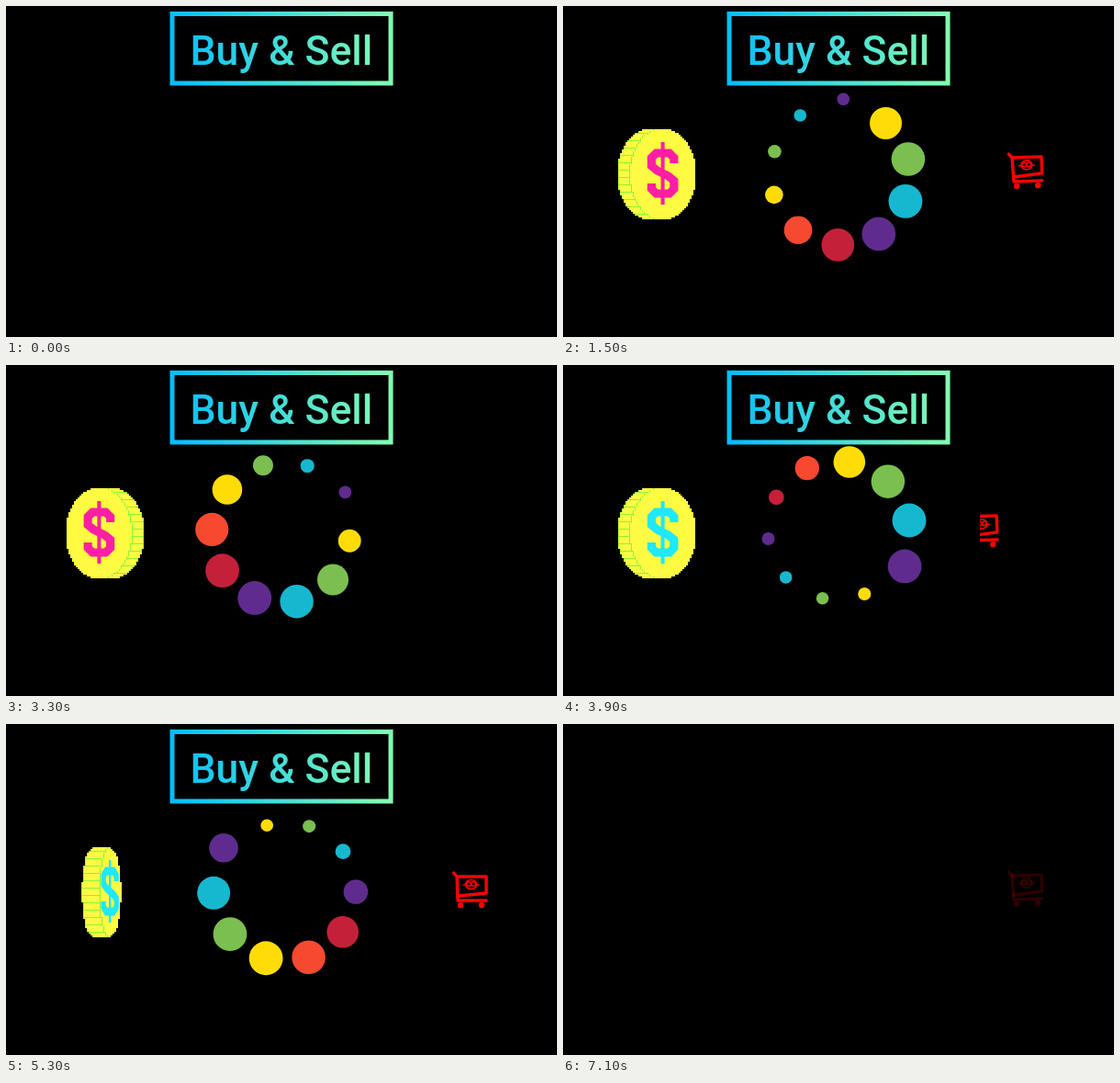
Write an HTML page with a canvas that moves like this. It is 600 px wide and 360 px high and loops after 7.2 s.

```html
<!DOCTYPE html>
<html lang="en">
<head>
<meta charset="utf-8">
<title>Buy &amp; Sell</title>
<style>
  html, body { margin: 0; width: 100%; height: 100%; overflow: hidden; background: #000; }
  canvas, svg { position: absolute; left: 0; top: 0; width: 600px; height: 360px; }
  text { font: 500 44.5px Roboto, sans-serif; }
</style>
</head>
<body>
<canvas id="stage" width="600" height="360"></canvas>
<svg id="title" viewBox="0 0 600 360">
  <defs>
    <linearGradient id="sky" gradientUnits="userSpaceOnUse" x1="179" y1="0" x2="421" y2="0">
      <stop offset="0" stop-color="#04bcff"/>
      <stop offset="1" stop-color="#84ffb0"/>
    </linearGradient>
  </defs>
  <rect x="181" y="8.5" width="238" height="75.5" fill="none" stroke="url(#sky)" stroke-width="5"/>
  <text x="299.8" y="64" text-anchor="middle" fill="url(#sky)">Buy &amp; Sell</text>
</svg>
<script>
const LOOP = 7200, STEP = 100, TAU = 2 * Math.PI;
const ctx = document.getElementById('stage').getContext('2d');
const title = document.getElementById('title');

const clamp = v => Math.max(0, Math.min(1, v));
const rad = deg => deg * Math.PI / 180;
const fade = (t, inAt, outAt) => Math.min(clamp((t - inAt) / 400), clamp((outAt - t) / 400));

// cubic-bezier(.75, 0, .25, 1)
function ease(x) {
  let lo = 0, hi = 1;
  for (let n = 0; n < 24; n++) {
    const s = (lo + hi) / 2, q = 1 - s;
    if (2.25 * s * q * q + 0.75 * s * s * q + s * s * s < x) lo = s; else hi = s;
  }
  return lo * lo * (3 - 2 * lo);
}

function trace(points) {
  ctx.beginPath();
  points.forEach(p => ctx.lineTo(...p));
  ctx.stroke();
}

function oval(x, y, rx, ry, paint) {
  ctx.beginPath();
  ctx.ellipse(x, y, rx, ry, 0, 0, TAU);
  ctx[paint]();
}

// ---- ring of dots: one eased turn, with a size wave running round it
const DOTS = 10;
const COLORS = ['#ffdc05', '#7abf4f', '#16b8d0', '#5f2c8e', '#c4203a', '#f7492f'];

function drawRing(t) {
  const lead = -54.5 + 360 * ease((t - 490) / 7500);
  const wave = 0.00813 * t;
  // The ring sits off its pivot, and the last dots drift outwards.
  const cx = 302 + 4 * Math.cos(rad(lead + 123));
  const cy = 181 + 4 * Math.sin(rad(lead + 123));
  for (let i = 0; i < DOTS; i++) {
    const angle = rad(lead + 35.7 * i);
    const dist = 75 + 8.5 * (i / 9) ** 5;
    const r = 12.6 + 6 * Math.tanh(2.15 * Math.sin((i - wave) * TAU / 13.4));
    ctx.fillStyle = COLORS[i % COLORS.length];
    oval(cx + dist * Math.cos(angle), cy + dist * Math.sin(angle), r, r, 'fill');
  }
}

// ---- coin: sixteen poses per turn, pink in front and cyan behind
const HALF_S = [[12, -11], [12, -17], [7, -22], [-7, -22], [-12, -17], [-12, -8], [-6, -3]];
const S_SHAPE = [...HALF_S, ...HALF_S.map(([x, y]) => [-x, -y]).reverse()];
const snap = v => Math.round(v / 2) * 2;

function drawCoin(t) {
  const phase = Math.floor(t / 100) % 16, half = phase % 8;
  const turn = 4 - Math.abs(4 - half);               // 0 facing us, 4 edge-on
  const side = half && Math.sign(4 - half);          // side on which the rim shows
  const face = 97 * (1 - turn / 4), rim = 20 * (turn / 4) ** 0.3;
  const a = face / 2, left = -(face + rim) / 2;

  ctx.save();
  ctx.translate(105 + side * (4 - turn), 183);
  ctx.save();
  if (side > 0) ctx.scale(-1, 1);
  const row = (x0, x1, y, h, color) => {
    ctx.fillStyle = color;
    ctx.fillRect(x0, y, x1 - x0, h);
  };
  for (let y = -49; y < 48; y += 2) {
    const k = Math.sqrt(1 - ((y + 1) / 50) ** 2);
    const squeeze = rim * Math.max(0, 0.5 - k) / 2;
    const x0 = snap(left + a * (1 - k) + squeeze);
    const x1 = snap(left + rim + a * (1 + k) - squeeze);
    const edge = Math.min(x1, snap(left + rim + a * (1 - k)));
    row(x0, x1, y, 2, '#fffb42');
    row(x0, x0 + 1, y, 2, '#b8f83a');
    if (rim && (y + 49) % 8 === 4) row(x0, edge, y, 1, '#8df23c');
    if (rim && edge < x1) row(edge, edge + 1, y, 2, '#8df23c');
  }
  ctx.restore();

  ctx.translate(-side * rim / 2, -1);
  ctx.scale(Math.sqrt(face / 70), 1);
  ctx.strokeStyle = ctx.fillStyle = phase < 4 || phase > 12 ? '#ff1fa6' : '#1fe8ff';
  ctx.lineWidth = 9;
  if (face) {
    trace(S_SHAPE);
    ctx.fillRect(-2, -34, 4, 68);
  }
  ctx.restore();
}

// ---- cart: rests, leaves to the right, returns from the left
function cartShift(t) {
  if (t < 3300) return 80 * (1 - (1 - clamp((t - 2150) / 1150)) ** 1.3);
  return -80 * (1 - clamp((t - 3300) / 1900)) ** 1.3;
}

function drawCart(t) {
  const x = cartShift(t), leaving = x > 0;
  const hop = Math.floor((t / 100 + 1) / 2) % 2 === 0;
  ctx.save();
  ctx.beginPath();
  ctx.rect(454, 140, 102, 80);
  ctx.clip();
  ctx.translate(506 + x, 180);
  ctx.strokeStyle = ctx.fillStyle = '#f00';
  ctx.lineCap = ctx.lineJoin = 'round';
  if (leaving) {
    ctx.lineWidth = 2.4;
    for (const k of [-1, 0, 1]) trace([[-28, 12 + 6.5 * k], [-20, 12 + 3 * k]]);
  }
  if (hop) {
    ctx.translate(-1.5, -1.5);
    ctx.rotate(rad(leaving ? -4 : -2));
  }
  ctx.lineWidth = 3.4;
  trace([[-18.5, -18], [-15, -14], [-14, 12], [17, 12]]);
  trace([[-15, -14], [17, -14], [17, 4], [-14, 7]]);
  ctx.lineWidth = 1.6;
  oval(0.5, -5.5, 6, 5, 'stroke');
  for (const s of [-1, 1]) {
    oval(0.5 + 11.5 * s, 17, 3.2, 3.2, 'fill');
    oval(0.5 + 2.5 * s, -6, 2.6, 2.2, 'stroke');
    trace([[0.5 + 6 * s, -5], [0.5 + 8.5 * s, -5]]);
  }
  ctx.restore();
}

function layer(alpha, draw, t) {
  if (alpha <= 0) return;
  ctx.globalAlpha = alpha;
  draw(t);
  ctx.globalAlpha = 1;
}

function render(now) {
  const t = Math.floor((now % LOOP) / STEP) * STEP;
  ctx.clearRect(0, 0, 600, 360);
  title.style.opacity = clamp((6950 - t) / 400);
  layer(fade(t, 300, 7000), drawCoin, t);
  layer(fade(t, 500, 7050), drawRing, t);
  layer(fade(t, 500, 7170), drawCart, t);
}

const start = performance.now();
function tick() {
  render(performance.now() - start);
  requestAnimationFrame(tick);
}
tick();
</script>
</body>
</html>
```
